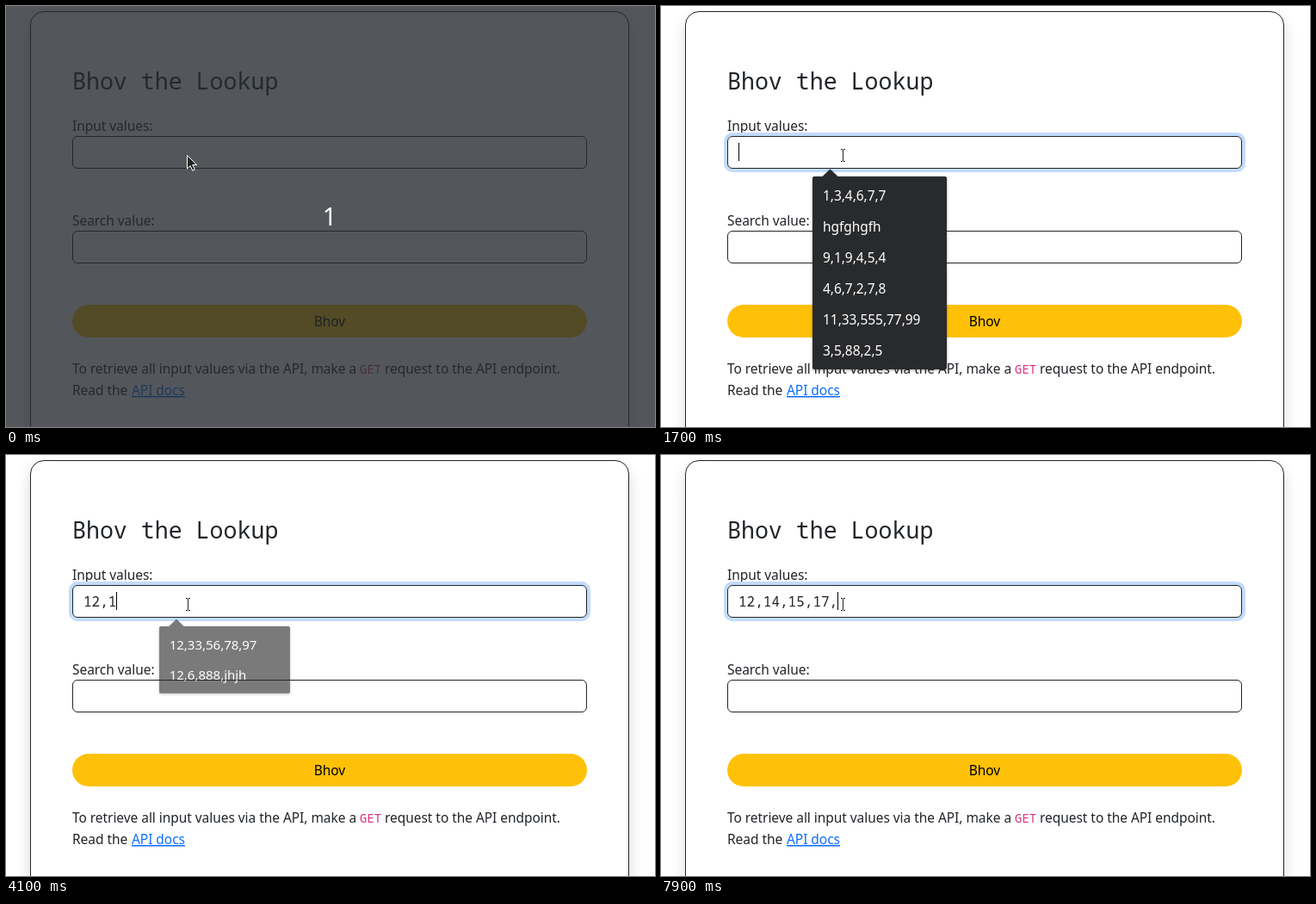
An HTML page for the animation above (8000 ms loop, 754 by 489 pixels).

```html
<!DOCTYPE html>
<html lang="en">
<head>
<meta charset="utf-8">
<title>Search form</title>
<style>
  html, body { margin: 0; width: 100%; height: 100%; overflow: hidden; background: #fff; }
  svg { display: block; width: 754px; height: 489px; }
  text { font: 15.5px "Noto Sans", sans-serif; letter-spacing: -.05px; fill: #212529; }
  .mono { font: 16px "Noto Sans Mono", monospace; letter-spacing: 0; }
  .title { font-size: 26.6px; }
  .code { font-size: 14px; fill: #d63384; }
  .link { fill: #0d6efd; text-decoration: underline; }
  .button { text-anchor: middle; fill: #000; }
  .count { font-size: 29px; text-anchor: middle; fill: #fff; }
  .field, .card { fill: #fff; stroke: #212529; }
  .card { filter: drop-shadow(0 8px 8px rgba(0, 0, 0, .15)); }
  #popup { transform-origin: 254px 234px; filter: drop-shadow(0 1px 1.5px rgba(0, 0, 0, .4)); }
  #popup rect, #popup path { fill: #292a2c; }
  #popup text { fill: #fff; }
</style>
</head>
<body>
<svg viewBox="0 0 754 489">
  <rect class="card" x="28.5" y="6.5" width="695" height="560" rx="15.5"/>
  <text class="mono title" x="77" y="97">Bhov the Lookup</text>

  <text x="77" y="145">Input values:</text>
  <rect id="ring" x="75" y="149" width="602" height="42" rx="8" fill="none" stroke="#c2dbfe" stroke-width="4"/>
  <rect class="field" x="77.5" y="151.5" width="597" height="37" rx="5.5"/>
  <text id="typed" class="mono" x="90" y="176"></text>
  <rect id="caret" y="159" width="1" height="21"/>

  <text x="77" y="255">Search value:</text>
  <rect class="field" x="77.5" y="261.5" width="597" height="37" rx="5.5"/>

  <rect x="77" y="347" width="598" height="38" rx="19" fill="#ffc107"/>
  <text class="button" x="376" y="372">Bhov</text>

  <text x="77" y="427">To retrieve all input values via the API, make a</text>
  <text class="mono code" x="411" y="427">GET</text>
  <text x="440" y="427">request to the API endpoint.</text>
  <text x="77" y="452">Read the</text>
  <text class="link" x="146" y="452">API docs</text>

  <g id="popup">
    <path d="M186.5 199L196.5 189.5L206.5 199z"/>
    <rect id="panel" x="176" y="198" width="156" rx="2"/>
    <g id="options"></g>
  </g>

  <g id="dim">
    <rect width="754" height="489" fill="rgb(38,42,48)" fill-opacity=".79"/>
    <text class="count" x="376" y="255">1</text>
    <path d="M210.5 173.5v15.5l3.6-3.4 2.7 5.6 2.6-1.2-2.7-5.5h4.9z" fill="#222" stroke="#fff"/>
  </g>
  <g id="beam" fill="none">
    <path d="M-3 -7.5H3M-3 7.5H3M0 -7V7" stroke="#fff" stroke-width="3"/>
    <path d="M-2.5 -7H-.5M.5 -7H2.5M-2.5 7H-.5M.5 7H2.5M0 -6.5V6.5" stroke="#222"/>
  </g>
</svg>
<script>
  const LOOP = 8000;
  const VALUE = "12,14,15,17,";
  const KEY_TIMES = [2300, 2500, 3000, 4000, 4500, 4800, 5200, 5800, 6200, 7200, 7700, 7900];
  const CARET_OFF = [[0, 500], [1100, 1700], [3600, 4000], [6800, 7200]];
  const HISTORY = ["1,3,4,6,7,7", "hgfghgfh", "9,1,9,4,5,4", "4,6,7,2,7,8", "11,33,555,77,99", "3,5,88,2,5"];
  const MATCHES = ["1,3,4,6,7,7", "11,33,555,77,99", "12,33,56,78,97", "12,6,888,jhjh"];
  // [start, opacity, scale]
  const POPUP_STEPS = [[0, 0, 1], [600, .98, 1], [700, 1, 1], [4100, .62, .974], [4200, .2, .96], [4300, 0, .96]];

  const el = id => document.getElementById(id);
  const show = (id, on) => el(id).style.display = on ? "" : "none";
  const SVG_NS = "http://www.w3.org/2000/svg";
  let listed = null;

  function setOptions(items) {
    const key = items.join("|");
    if (key === listed) return;
    listed = key;
    el("panel").setAttribute("height", items.length * 36 + 8);
    el("options").replaceChildren(...items.map((item, i) => {
      const line = document.createElementNS(SVG_NS, "text");
      line.setAttribute("x", 188);
      line.setAttribute("y", 226 + 36 * i);
      line.textContent = item;
      return line;
    }));
  }

  function draw(t) {
    const count = KEY_TIMES.filter(k => k <= t).length;
    el("typed").textContent = VALUE.slice(0, count);
    el("caret").setAttribute("x", Math.floor(90 + 9.6 * count));
    show("caret", !CARET_OFF.some(([from, to]) => t >= from && t < to));

    show("dim", t < 100);
    show("beam", t >= 100);
    el("beam").setAttribute("transform", t < 500 ? "translate(210.5 174.5)" : "translate(211.5 173.5)");
    el("ring").style.opacity = t < 500 ? 0 : t < 600 ? .5 : 1;

    setOptions(count === 0 ? HISTORY : count === 1 ? MATCHES : MATCHES.slice(2));
    const [, opacity, scale] = POPUP_STEPS.findLast(step => step[0] <= t);
    el("popup").style.opacity = opacity;
    el("popup").style.transform = `scale(${scale})`;
  }

  const start = performance.now();
  function tick() {
    draw((performance.now() - start) % LOOP);
    requestAnimationFrame(tick);
  }
  tick();
</script>
</body>
</html>
```
